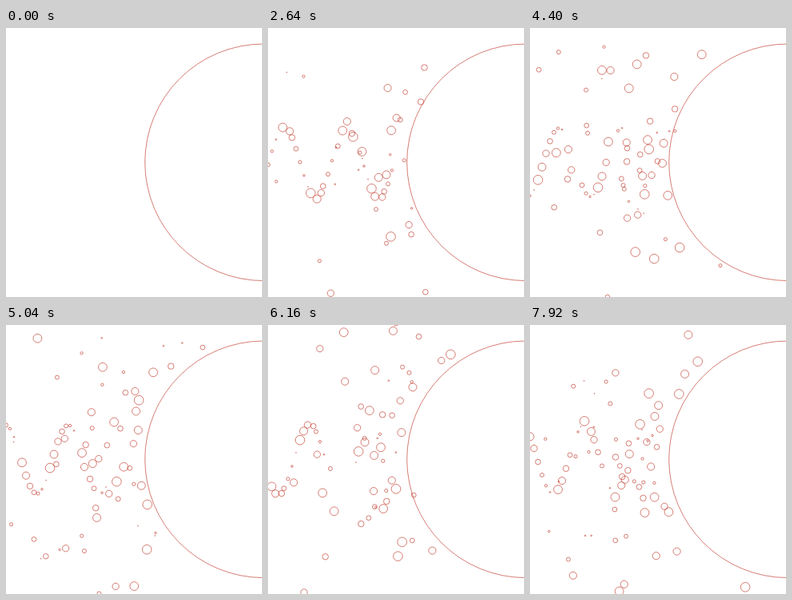
These frames come from a looping animation (320 by 337 pixels, 8000 ms). An HTML page with a canvas:

```html
<!DOCTYPE html>
<html>
<head>
<meta charset="utf-8">
<style>
  html, body { margin: 0; width: 100%; height: 100%; overflow: hidden; background: #fff; }
  canvas { display: block; }
</style>
</head>
<body>
<canvas id="stage" width="320" height="337"></canvas>
<script>
const W = 320, H = 337, MARGIN = 30;
const LOOP = 8000, FRAME = 80, START_FRAME = 12, STEPS_PER_FRAME = 3;
const SPEED = 5, MID_Y = 168.4, AMPLITUDE = 43;
const disc = { x: 322, y: 168.3, vx: 0, vy: 0, r: 148.3, mass: Infinity };
const ctx = document.getElementById('stage').getContext('2d');

let balls = [], step = -1;

// Radii follow a sawtooth, heights a sine, one ball per step.
function emit(i) {
  const r = 0.83 * (i % 7.5);
  balls.push({
    x: 0,
    y: MID_Y + AMPLITUDE * Math.sin(0.4 * i),
    vx: SPEED,
    vy: 0,
    r,
    mass: r * r
  });
}

// Elastic collision; the lighter body takes the larger share.
function collide(a, b) {
  const dx = b.x - a.x, dy = b.y - a.y, reach = a.r + b.r;
  const dist = Math.hypot(dx, dy);
  if (dist >= reach || dist === 0) return;
  const nx = dx / dist, ny = dy / dist;
  const shareB = a.mass === Infinity ? 1 : a.mass / (a.mass + b.mass);
  const shareA = 1 - shareB;
  const overlap = reach - dist;
  a.x -= nx * overlap * shareA; a.y -= ny * overlap * shareA;
  b.x += nx * overlap * shareB; b.y += ny * overlap * shareB;
  const closing = (a.vx - b.vx) * nx + (a.vy - b.vy) * ny;
  if (closing <= 0) return;
  const kick = 2 * closing;
  a.vx -= nx * kick * shareA; a.vy -= ny * kick * shareA;
  b.vx += nx * kick * shareB; b.vy += ny * kick * shareB;
}

const nearStage = ({ x, y }) =>
  x > -MARGIN && x < W + MARGIN && y > -MARGIN && y < H + MARGIN;

function advance() {
  step++;
  const bodies = [disc, ...balls];
  bodies.forEach((a, i) => {
    for (let j = i + 1; j < bodies.length; j++) collide(a, bodies[j]);
  });
  for (const b of balls) { b.x += b.vx; b.y += b.vy; }
  balls = balls.filter(nearStage);
  emit(step);
}

function seek(target) {
  if (target < step) { balls = []; step = -1; }
  while (step < target) advance();
}

function ring({ x, y, r }) {
  ctx.beginPath();
  ctx.arc(x, y, r, 0, 2 * Math.PI);
  ctx.stroke();
}

function draw() {
  const frame = Math.floor(performance.now() % LOOP / FRAME);
  seek(Math.max(-1, (frame - START_FRAME) * STEPS_PER_FRAME));
  ctx.fillStyle = '#fff';
  ctx.fillRect(0, 0, W, H);
  ctx.strokeStyle = '#c0392b';
  ctx.lineWidth = 0.65;
  ring(disc);
  for (const b of balls) if (b.r > 0.1) ring(b);
  requestAnimationFrame(draw);
}
draw();
</script>
</body>
</html>
```
